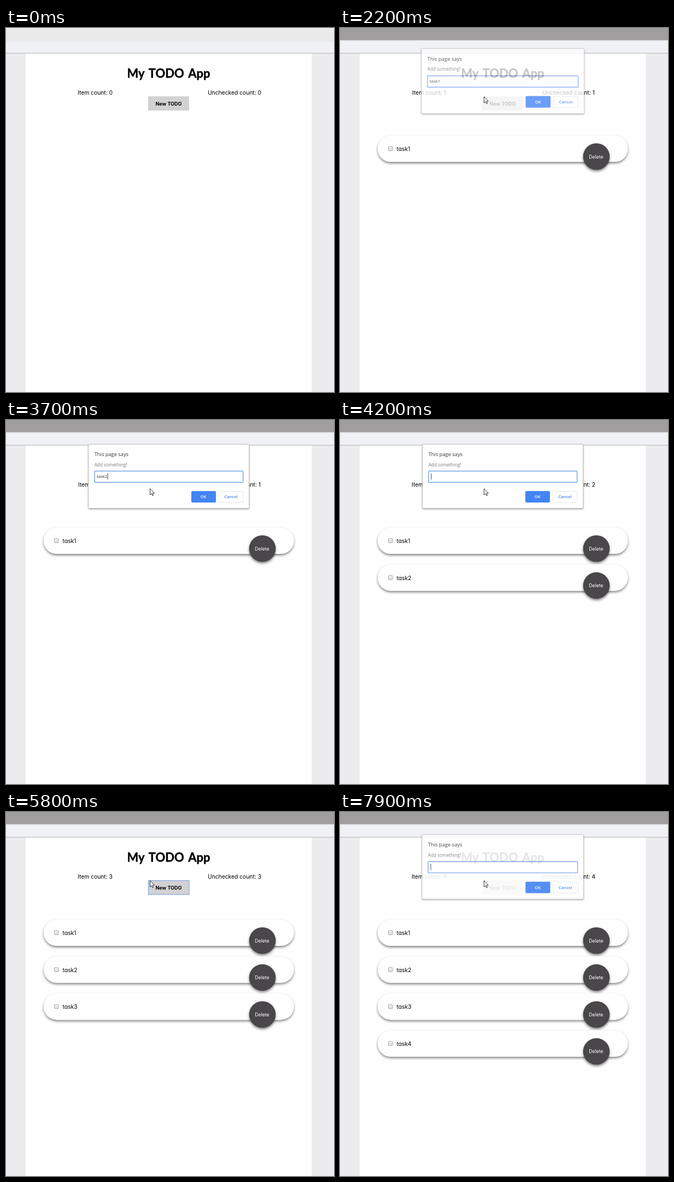
These frames come from a looping animation (600 by 666 pixels, 8000 ms). An HTML page:

```html
<!DOCTYPE html>
<html lang="en">
<head>
<meta charset="utf-8">
<title>My TODO App</title>
<style>
  html, body { margin: 0; width: 100%; height: 100%; overflow: hidden; background: #ecebed; }
  svg { display: block; width: 600px; height: 666px; }
  .app { font: 10.3px "Comic Sans MS", Inter, "Open Sans", sans-serif; font-feature-settings: "cv11"; }
  .title { font: bold 22px "Comic Sans MS", Lato, sans-serif; word-spacing: 3px;
           stroke: #000; stroke-width: .4; stroke-linejoin: round; }
  .mid { text-anchor: middle; }
  .button { font-size: 9px; font-weight: bold; }
  .delete { font-size: 8.7px; fill: #fff; }
  .box { font: 7.7px "Open Sans", sans-serif; }
  .says { font-size: 9.3px; fill: #333; }
  .ask { font-size: 8.2px; fill: #7a7a7a; }
  .strong { font-weight: 600; }
</style>
</head>
<body>
<svg viewBox="0 0 600 666">
  <defs>
    <filter id="soft" x="-10%" y="-30%" width="120%" height="180%">
      <feDropShadow dx="0" dy="2.5" stdDeviation="2.2" flood-color="#000" flood-opacity=".5"/>
    </filter>
    <filter id="lift" x="-10%" y="-10%" width="120%" height="130%">
      <feDropShadow dx="0" dy="1.2" stdDeviation="1.4" flood-color="#000" flood-opacity=".4"/>
    </filter>
    <linearGradient id="check" x2="0" y2="1">
      <stop stop-color="#f3f3f3"/><stop offset="1" stop-color="#dcdcdc"/>
    </linearGradient>
    <g id="card">
      <rect x="69" y="197" width="457.5" height="48" rx="24" fill="#fefefe" filter="url(#soft)"/>
      <rect x="88.5" y="217" width="7.5" height="7.5" rx="1" fill="url(#check)" stroke="#aaa"/>
      <circle cx="469" cy="235.3" r="24.3" fill="#494748" filter="url(#soft)"/>
      <text class="delete mid" x="468.5" y="238.6">Delete</text>
    </g>
  </defs>

  <rect width="600" height="666" fill="#ecebed"/>
  <rect x="36" y="46" width="523.5" height="620" fill="#fefefe"/>
  <rect y="0" width="600" height="46" fill="#eff1f4"/>
  <rect id="strip" width="600" height="25"/>
  <rect y="45.5" width="600" height="1.2" fill="#bdbabf"/>

  <g class="app">
    <text class="title mid" x="297.5" y="91">My TODO App</text>
    <text id="total" class="mid" x="163" y="122"></text>
    <text id="open" class="mid" x="418" y="122"></text>
    <rect x="260" y="125" width="75" height="26" fill="#d3d2d3"/>
    <rect id="ring" x="260.5" y="125.5" width="74.5" height="25.5" fill="none" stroke="#7fa6e6" stroke-width="1.2"/>
    <text class="button mid" x="297.5" y="141.7">New TODO</text>
    <g id="list"></g>
  </g>

  <g id="dialog" class="box">
    <rect x="151" y="44.5" width="293.5" height="117" rx="1" fill="#fff" stroke="#b9b9bd" stroke-width=".8" filter="url(#lift)"/>
    <text class="says" x="161.7" y="66">This page says</text>
    <text class="ask" x="161.7" y="84.5">Add something!</text>
    <rect x="162" y="93.5" width="271.7" height="20.5" rx="1" fill="#fff" stroke="#76a3ea" stroke-width="1.4"/>
    <text id="entry" x="166" y="106.3" fill="#333"></text>
    <rect id="caret" y="97.5" width=".9" height="11.5" fill="#333"/>
    <rect x="339" y="130" width="45" height="21" rx="2" fill="#4384f4"/>
    <text class="mid strong" x="361.3" y="143.2" fill="#fff">OK</text>
    <rect x="389.5" y="130.5" width="44.5" height="20" rx="2" fill="#fff" stroke="#e3e6eb"/>
    <text class="mid strong" x="411.5" y="143.2" fill="#4384f4">Cancel</text>
  </g>

  <path id="pointer" d="M0 0V11.5L2.7 9.1L4.5 13.2L6.2 12.4L4.5 8.5H7.9Z" fill="#fff" stroke="#222" stroke-width=".9" stroke-linejoin="round"/>
</svg>

<script>
const LOOP = 8000, TICK = 100;
const $ = id => document.getElementById(id);

// Rows are [start in ms, value]; each value holds until the next row.
const shown = [
  [0, 0], [600, .5], [700, .88], [800, 1],
  [2100, .94], [2200, .78], [2300, .3], [2400, 0],
  [2700, .4], [2800, .85], [2900, 1],
  [3900, .55], [4000, 0], [4100, .6], [4200, 1],
  [5700, .5], [5800, 0], [6000, .45], [6100, .88], [6200, 1],
  [7500, .55], [7600, 0], [7800, .45], [7900, .9]
];
const typed = [
  [0, ""], [1200, "t"], [1300, "ta"], [1500, "tas"], [1700, "task"], [1900, "task1"],
  [2400, ""], [3400, "task"], [3600, "task2"],
  [4000, ""], [4400, "t"], [4600, "ta"], [4700, "tas"], [5100, "task"], [5300, "task3"],
  [5800, ""], [6500, "t"], [6600, "tas"], [6800, "task"], [7100, "task4"],
  [7600, ""]
];
const caretOn = [
  [0, 1], [2100, 0], [2700, 1], [3900, 0], [4100, 1], [4900, 0], [5100, 1],
  [5700, 0], [6000, 1], [7500, 0], [7800, 1]
];
const added = [[0, 0], [2100, 1], [3900, 2], [5700, 3], [7500, 4]];
const pointerAt = [[100, [304, 127]], [300, [288, 126]], [400, [272, 125.5]], [500, [263.5, 125.5]]];

const at = (rows, t) => rows.findLast(row => row[0] <= t)?.[1];
const toggle = (el, on) => el.style.visibility = on ? "visible" : "hidden";

const cards = [1, 2, 3, 4].map(n => {
  $("list").insertAdjacentHTML("beforeend",
    `<g transform="translate(0 ${(n - 1) * 67.6})"><use href="#card"/><text x="103.5" y="225">task${n}</text></g>`);
  return $("list").lastElementChild;
});

function draw(t) {
  const active = t >= 300;
  $("strip").setAttribute("height", active ? 22.5 : 25);
  $("strip").setAttribute("fill", active ? "#a09e9f" : "#eaeaeb");

  const count = at(added, t);
  $("total").textContent = "Item count: " + count;
  $("open").textContent = "Unchecked count: " + count;
  cards.forEach((card, i) => toggle(card, i < count));

  const alpha = at(shown, t), away = 1 - alpha;
  toggle($("ring"), t >= 500 && alpha === 0);
  $("dialog").setAttribute("opacity", alpha);
  $("dialog").setAttribute("transform",
    `translate(297.5 ${103 - 27 * away}) scale(${1 + .065 * away}) translate(-297.5 -103)`);
  $("entry").textContent = at(typed, t);
  $("caret").setAttribute("x", 166.5 + $("entry").getComputedTextLength());
  toggle($("caret"), at(caretOn, t));

  const spot = at(pointerAt, t);
  toggle($("pointer"), spot);
  if (spot) $("pointer").setAttribute("transform", `translate(${spot})`);
}

const start = performance.now();
function frame() {
  const t = (performance.now() - start) % LOOP;
  draw(Math.floor(t / TICK) * TICK);
  requestAnimationFrame(frame);
}
frame();
</script>
</body>
</html>
```
